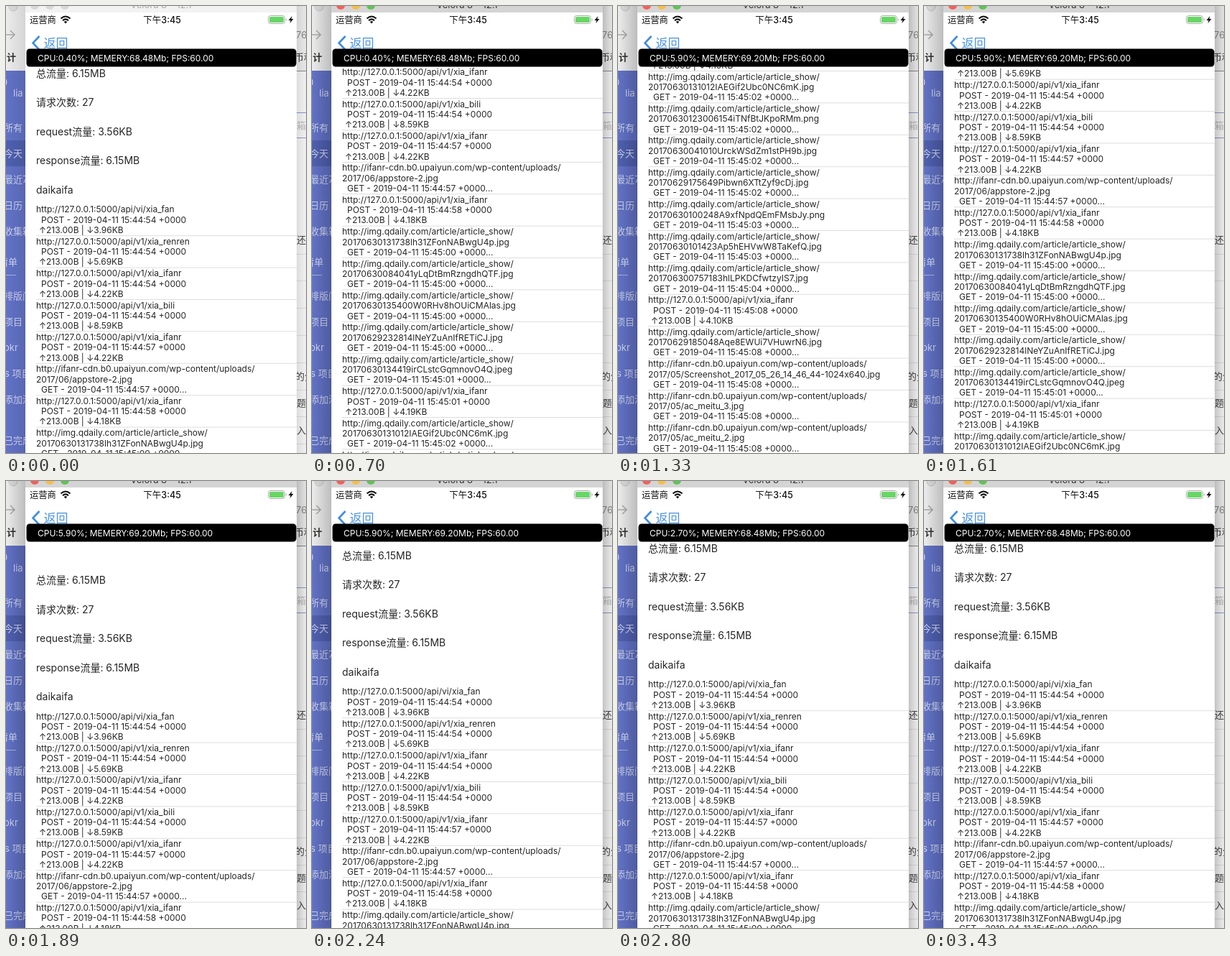
Animation of 418 by 622 pixels, one loop 3.5 s. Source, as an HTML page:

```html
<!DOCTYPE html>
<html lang="zh-CN">
<head>
<meta charset="utf-8">
<title>流量</title>
<style>
html, body { margin: 0; width: 100%; height: 100%; overflow: hidden; background: #fff; }
svg { display: block; width: 418px; height: 622px; }
text { font-family: Inter, "Noto Sans CJK SC", "Noto Sans CJK", sans-serif; white-space: pre; }
#list { font-size: 12px; fill: #262626; }
#list .head { font-size: 14px; }
#list path { stroke: #dedede; }
#side { font-size: 13px; fill: #cdd4f2; }
#right { font-size: 13px; fill: #333; }
</style>
</head>
<body>
<svg viewBox="0 0 418 622">
  <defs>
    <linearGradient id="shadeL"><stop offset="0" stop-opacity="0"/><stop offset="1" stop-opacity=".2"/></linearGradient>
    <linearGradient id="shadeR"><stop offset="0" stop-opacity=".2"/><stop offset="1" stop-opacity=".04"/></linearGradient>
    <clipPath id="view"><path d="M27 70H405V622H27z"/></clipPath>
  </defs>

  <rect width="418" height="622" fill="#f5f5f5"/>
  <rect width="418" height="90" fill="#ececec"/>
  <rect y="90" width="27" height="532" fill="#6272c6"/>
  <rect y="187" width="27" height="36" fill="#5060b0"/>
  <circle cx="10" cy="1" r="6" fill="#ddd" stroke="#c4c4c4"/>
  <path d="M0 40H12M6 34L12 40L6 46" fill="none" stroke="#aaa" stroke-width="1.5"/>
  <text x="1" y="76" font-size="13" font-weight="600" fill="#333">计</text>
  <path d="M0 102Q2 106 0 110" fill="none" stroke="#dfe4fa"/>
  <g id="side"></g>
  <path d="M0 374.5H14" stroke="#a9b3e2"/>

  <g id="right"></g>
  <path d="M405 90.5H418" stroke="#888"/>
  <path d="M405 148.5H418M405 183.5H418" stroke="#8d97d0"/>
  <path d="M405 345.5H418M405 382.5H418M405 420.5H418M405 458.5H418M405 496.5H418M405 534.5H418M405 571.5H418M405 609.5H418" stroke="#ddd"/>
  <g id="shadow">
    <rect width="27" height="622" fill="url(#shadeL)"/>
    <rect x="405" width="13" height="622" fill="url(#shadeR)"/>
  </g>

  <rect x="27" width="378" height="622" fill="#fff"/>
  <g clip-path="url(#view)"><g id="list"></g></g>

  <rect id="titlebar" x="27" width="378" height="9"/>
  <g id="lights"><circle cx="40" cy="-1" r="6"/><circle cx="61" cy="-1" r="6"/><circle cx="82" cy="-1" r="6"/></g>
  <text id="title" x="216" y="3" font-size="13" text-anchor="middle">Velora 8 - 12.1</text>

  <text x="33" y="24" font-size="12.3" fill="#111">运营商</text>
  <path d="M76.500 17.500Q83 11.500 89.500 17.500M79 20.300Q83 16.500 87 20.300" fill="none" stroke="#111" stroke-width="2"/>
  <path d="M80.800 22Q83 20 85.200 22L83 24.500z" fill="#111"/>
  <text x="217.500" y="24" font-size="12.5" font-weight="500" text-anchor="middle" fill="#111">下午3:45</text>
  <rect x="365.500" y="13.500" width="23" height="11" rx="3" fill="#fff" stroke="#aaa"/>
  <rect x="367" y="15" width="20" height="8" rx="1.500" fill="#68d666"/>
  <path d="M390 17Q392 19 390 21z" fill="#aaa"/>
  <path d="M398.500 14L393.500 20H396.500L395.500 24L400.500 18H397.500z" fill="#111"/>
  <path d="M46.500 42L37.500 51.500L46.500 61" fill="none" stroke="#3c8ce4" stroke-width="2.600"/>
  <text x="52.500" y="57.500" font-size="17" fill="#4a94e4">返回</text>

  <rect x="28.500" y="59.500" width="376" height="25" rx="4.500"/>
  <text id="stats" x="44" y="76.500" font-size="12" fill="#fff"></text>
</svg>
<script>
const $ = id => document.getElementById(id);
const label = (x, y, s, attr = '') => `<text x="${x}" y="${y}" ${attr}>${s}</text>`;

$('side').innerHTML = [
  [10, 121, 'lia'], [-3, 169, '所有'], [-3, 205, '今天'], [-3, 241, '最近7'], [-3, 277, '日历'],
  [-3, 313, '收集箱'], [-10, 356, '清单'], [-3, 403, '排版问'], [-3, 439, '项目'], [-3, 475, 'okr'],
  [-2, 511, 's 项目'], [-3, 547, '添加清'], [-3, 604, '已完成']
].map(([x, y, s]) => label(x, y + 5, s)).join('');

$('right').innerHTML = [
  [404, 40, '76', '#888'], [402, 71, '币和', '#333'], [405, 166, '箱"', '#bbb'], [405, 325, '还', '#444'],
  [403, 515, '的分', '#444'], [405, 552, '题', '#444'], [405, 590, '入', '#444']
].map(([x, y, s, c]) => label(x, y + 5, s, `fill="${c}"`)).join('');

// Requests: "time path size" for API calls, "time file" for pictures
const rows = `44:54 vi/xia_fan 3.96
44:54 v1/xia_renren 5.69
44:54 v1/xia_ifanr 4.22
44:54 v1/xia_bili 8.59
44:57 v1/xia_ifanr 4.22
44:57 2017/06/appstore-2.jpg
44:58 v1/xia_ifanr 4.18
45:00 20170630131738lh31ZFonNABwgU4p.jpg
45:00 20170630084041yLqDtBmRzngdhQTF.jpg
45:00 20170630135400W0RHv8hOUiCMAlas.jpg
45:00 20170629232814lNeYZuAnIfRETiCJ.jpg
45:01 20170630134419irCLstcGqmnovO4Q.jpeg
45:01 v1/xia_ifanr 4.19
45:02 20170630131012IAEGif2Ubc0NC6mK.jpg
45:02 20170630123006154iTNfBtJKpoRMm.png
45:02 20170630041010UrckWSdZm1stPH9b.jpg
45:02 20170629175649Pibwn6XTtZyf9cDj.jpg
45:03 20170630100248A9xfNpdQEmFMsbJy.png
45:03 20170630101423Ap5hEHVwW8TaKefQ.jpg
45:04 201706300757183hlLPKDCfwtzyIS7.jpg
45:08 v1/xia_ifanr 4.10
45:08 20170629185048Aqe8EWUi7VHuwrN6.jpg
45:08 2017/05/Screenshot_2017_05_26_14_46_44-1024x640.jpg
45:08 2017/05/ac_meitu_3.jpg
45:08 2017/05/ac_meitu_2.jpg
45:08 2017/05/ac_meitu_1.jpg
45:08 v1/xia_ifanr 4.10`.split('\n');

function row(line, i) {
  const [time, path, size] = line.split(' ');
  const y = 287.3 + 44.4 * i;
  const stamp = `2019-04-11 15:${time} +0000`;
  const host = path[4] === '/' ? 'ifanr-cdn.b0.upaiyun.com/wp-content/uploads/' : 'img.qdaily.com/article/article_show/';
  const text = size
    ? label(42, y, 'http://127.0.0.1:5000/api/' + path) + label(49, y + 14.4, 'POST - ' + stamp) +
      label(46, y + 28.6, `↑213.00B | ↓${size}KB`)
    : label(42, y, 'http://' + host) + label(42, y + 14.4, path) + label(49, y + 28.6, `GET - ${stamp}...`);
  return text + `<path d="M42 ${y + 32.4}H405"/>`;
}

$('list').innerHTML =
  ['总流量: 6.15MB', '请求次数: 27', 'request流量: 3.56KB', 'response流量: 6.15MB', 'daikaifa']
    .map((s, i) => label(42, 99 + 40.4 * i, s, 'class="head"')).join('') + rows.map(row).join('');

// Scroll offset: time, position, speed (px per ms)
const keys = [
  [0, 0, 0], [210, 10, .15], [700, 280, 1.1], [1050, 732, .8], [1260, 800, 0],
  [1610, 262, -1.6], [1960, -60, 0], [2240, -10, .09], [2520, 0, 0], [3500, 0, 0]
];

function scrollAt(t) {
  const i = keys.findIndex(k => k[0] > t);
  const [t0, p0, v0] = keys[i - 1], [t1, p1, v1] = keys[i];
  const d = t1 - t0, u = (t - t0) / d, w = 1 - u;
  return w * w * ((1 + 2 * u) * p0 + u * d * v0) + u * u * ((3 - 2 * u) * p1 - w * d * v1);
}

const lit = ['#f4605a', '#f6be45', '#5fc454'];

function draw(now) {
  const t = Math.floor(now % 3500 / 70) * 70;
  $('list').setAttribute('transform', `translate(0 ${-scrollAt(t).toFixed(1)})`);
  const [cpu, mem] = t < 1260 ? ['0.40', '68.48'] : t < 2450 ? ['5.90', '69.20'] : ['2.70', '68.48'];
  $('stats').textContent = `CPU:${cpu}%; MEMERY:${mem}Mb; FPS:60.00`;

  // The window gains focus right after the loop begins
  const active = t >= 70;
  [...$('lights').children].forEach((c, i) => c.setAttribute('fill', active ? lit[i] : '#d8d8d8'));
  $('title').setAttribute('fill', active ? '#333' : '#aaa');
  $('titlebar').setAttribute('fill', active ? '#d4d4d4' : '#f2f2f2');
  $('shadow').setAttribute('opacity', active ? 1 : .5);
  requestAnimationFrame(draw);
}
draw(performance.now());
</script>
</body>
</html>
```
